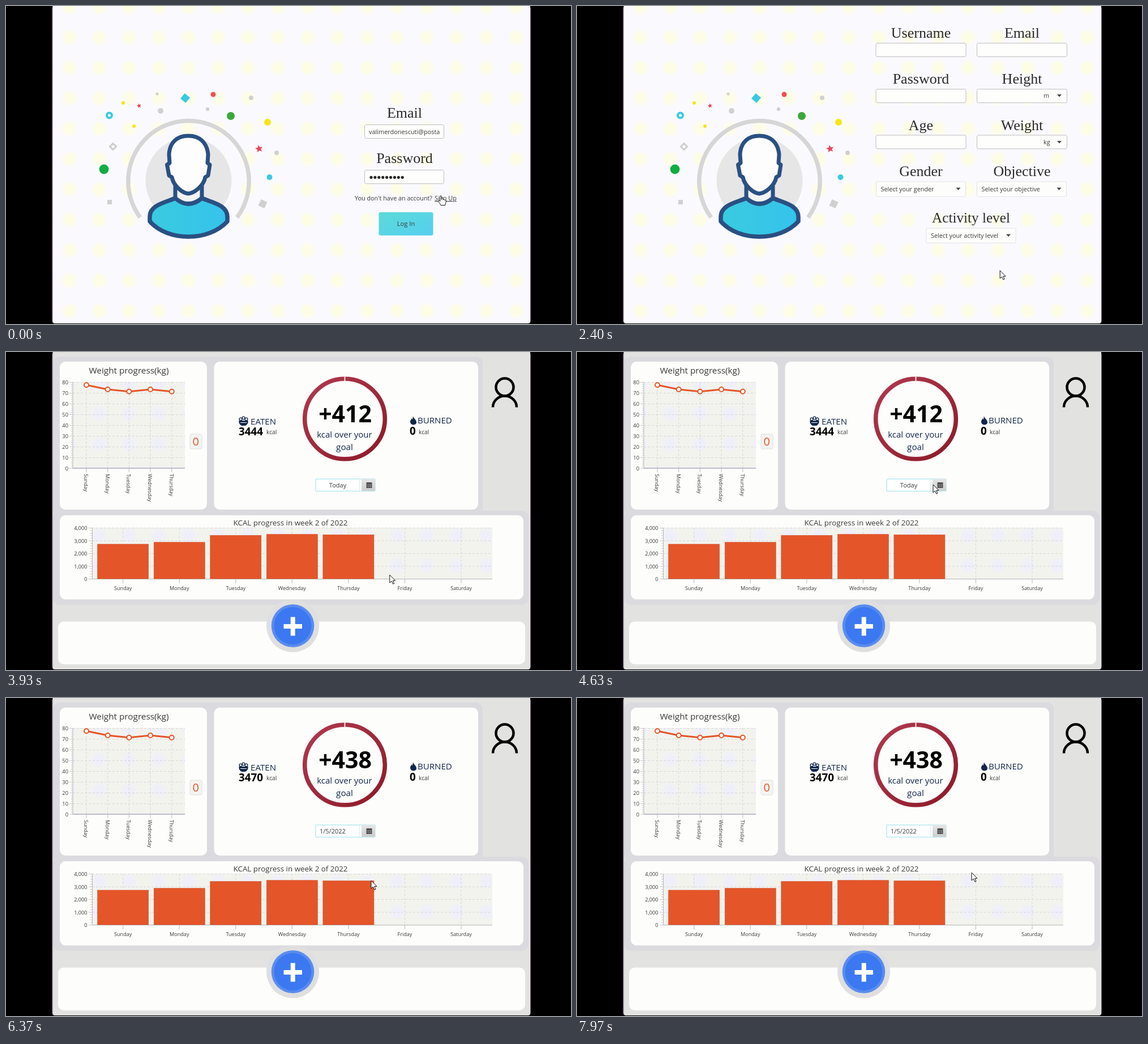
Animation, 998 px wide and 561 px high, one loop 8000 ms. Source, as an HTML page:

```html
<!DOCTYPE html>
<html lang="en">
<head>
<meta charset="utf-8">
<title>Calorie tracker</title>
<style>
  html, body { margin: 0; width: 100%; height: 100%; overflow: hidden; background: #000; }
  svg { display: block; width: 998px; height: 561px; }
  text { font-family: 'Open Sans', 'Noto Sans', sans-serif; fill: #3a3a3a; }
  .serif { font-family: 'Liberation Serif', 'Times New Roman', serif; fill: #2b2b2b; }
  .bold { font-weight: 700; fill: #000; }
  .navy { fill: #10264a; }
</style>
</head>
<body>
<svg id="stage" viewBox="0 0 998 561"></svg>
<script>
const ORANGE = '#e45529', CYAN = '#38cbe0', GREY = '#d0d0d0', NAVY = '#2a5082', RED = '#e8465a';
const DAYS = ['Sunday', 'Monday', 'Tuesday', 'Wednesday', 'Thursday', 'Friday', 'Saturday'];
const list = (n, fn) => Array.from({ length: n }, (_, i) => fn(i)).join('');

const rect = (x, y, w, h, fill, r = 0, extra = '') =>
  `<rect x="${x}" y="${y}" width="${w}" height="${h}" rx="${r}" fill="${fill}" ${extra}/>`;
const circle = (x, y, r, fill, extra = '') =>
  `<circle cx="${x}" cy="${y}" r="${r}" fill="${fill}" ${extra}/>`;
const path = (d, fill = 'none', stroke = 'none', width = 1, extra = '') =>
  `<path d="${d}" fill="${fill}" stroke="${stroke}" stroke-width="${width}" ${extra}/>`;
const text = (x, y, size, str, anchor = 'middle', cls = '', extra = '') =>
  `<text x="${x}" y="${y}" font-size="${size}" text-anchor="${anchor}" class="${cls}" ${extra}>${str}</text>`;
const group = (id, body) => `<g id="${id}">${body}</g>`;
const label = (x, y, str) => text(x, y, 26, str, 'middle', 'serif');
const field = (x, y, w) => rect(x + .5, y + .5, w - 1, 24, '#fefefc', 3, 'stroke="#bdbdbf"');
const arrowDown = (x, y) => path(`M${x - 4} ${y - 2}h8l-4 4.5z`, '#444');
const select = (x, y, str) =>
  rect(x + .5, y + .5, 158, 26, '#fdfdfc', 2, 'stroke="#e2e2e4"') +
  text(x + 8.5, y + 17, 10.8, str, 'start') + arrowDown(x + 145.5, y + 13);
const square = (x, y, s, angle, fill) =>
  rect(x - s / 2, y - s / 2, s, s, fill, 0, `transform="rotate(${angle} ${x} ${y})"`);
const star = (x, y, r) => path('M' + Array.from({ length: 10 }, (_, i) => {
  const a = i * Math.PI / 5 - 1.75, d = i % 2 ? r * .45 : r;
  return `${x + d * Math.cos(a)} ${y + d * Math.sin(a)}`;
}).join('L') + 'z', RED);

const blobs = (id, color) => `
  <radialGradient id="${id}Spot"><stop offset=".45" stop-color="${color}"/>
    <stop offset="1" stop-color="${color}" stop-opacity="0"/></radialGradient>
  <pattern id="${id}" x="85.7" y="28.7" width="52.6" height="53.6" patternUnits="userSpaceOnUse">
    ${circle(26.3, 26.8, 16, `url(#${id}Spot)`)}</pattern>`;
const gradient = (id, from, to, dir = 'x2="1"') =>
  `<linearGradient id="${id}" ${dir}><stop stop-color="${from}"/><stop offset="1" stop-color="${to}"/></linearGradient>`;

const defs = `<defs>
  ${blobs('yellow', '#fdfde6')}${blobs('lavender', '#efeffa')}
  ${gradient('button', '#5bdad8', '#55cff0', 'x2="1" y2="1"')}
  ${gradient('ring', '#b03a50', '#8c1a28', 'x2="1" y2="1"')}
  ${gradient('grey', '#e6e6e6', '#cccccc', 'x2="0" y2="1"')}
  ${gradient('shirt', '#3acbe0', '#35c3ec')}
  <filter id="shadow" x="-10%" y="-10%" width="120%" height="125%">
    <feDropShadow dx="0" dy="3" stdDeviation="4" flood-opacity=".4"/></filter>
</defs>`;

function portrait() {
  const confetti =
    circle(182.5, 193, 4.5, '#fff', `stroke="${CYAN}" stroke-width="4"`) +
    [[207, 171, 3, '#f5e617'], [226, 212, 3, '#f5e617'], [462, 205, 6, '#f5e617'],
     [267, 155, 2.6, GREY], [273, 185, 5, GREY], [356, 182, 3.2, GREY], [433, 162, 4, GREY], [478, 259, 4, GREY],
     [366, 156, 4.5, '#ee5050'], [397, 194, 7, '#3aa83a'], [173, 288, 8.4, '#12ad42'], [465.5, 302, 5, CYAN]]
      .map(c => circle(...c)).join('') +
    square(316.5, 162.5, 12, 40, CYAN) + square(183, 346, 8, 0, GREY) + square(453.5, 349, 12, 25, GREY) +
    square(189, 248, 11, 45, GREY) + circle(189, 248, 2.5, '#fff') +
    star(235, 176, 4.3) + star(447, 252, 7);
  return confetti + circle(322.5, 308, 76, '#e6e6e7') +
    path('M237 373A106.7 106.7 0 1 1 408 373', 'none', '#d6d6d6', 7.5) +
    path('M299 314V342Q322 358 346 342V314', '#f3f3f3', NAVY, 7) +
    path('M299 339C280 347 254 351 254 372V380C286 416 358 416 391 380V372C391 351 365 347 346 339Q322 359 299 339Z',
      'url(#shirt)', NAVY, 7.5, 'stroke-linejoin="round"') +
    path('M289 277L288 262C289 240 303 229 322 229S355 240 357 262L356 277L360 280L357 299L352 302C349 318 332 330 322 331C312 330 296 318 293 302L288 299L284.5 280Z',
      '#fdfdfd', NAVY, 7, 'stroke-linejoin="round"');
}

const login =
  label(704, 197, 'Email') + field(633, 209, 141) +
  text(641, 226, 10.9, 'valimerdonescuti@posta', 'start') +
  label(704, 277, 'Password') + field(633, 289, 141) +
  list(9, i => circle(645 + 6.9 * i, 302.3, 2.6, '#2a2a2a')) +
  text(616, 343, 10.8, "You don't have an account?", 'start') +
  text(757, 343, 10.9, 'Sign Up', 'start', '', 'text-decoration="underline"') +
  group('logButton', rect(658.5, 364, 96, 41, 'url(#button)', 3) + text(706.5, 388, 11.2, 'Log In'));

const signUp =
  [['Username', 'Email'], ['Password', 'Height'], ['Age', 'Weight'], ['Gender', 'Objective']].map((row, i) =>
    row.map((name, col) => label(607.5 + col * 178.5, 56 + i * 81.3, name) +
      (i < 3 ? field(527.5 + col * 178.5, 65 + i * 81.2, 160) : '')).join('')).join('') +
  [['m', 158], ['kg', 240]].map(([unit, y]) => text(824, y + 3.5, 10.8, unit, 'start') + arrowDown(852, y)).join('') +
  select(528, 309.5, 'Select your gender') + select(706, 309.5, 'Select your objective') +
  text(696, 382, 25.2, 'Activity level', 'middle', 'serif') + select(616.5, 391.5, 'Select your activity level');

const activityMenu =
  rect(618, 419.5, 244.5, 126, '#fdfdfc', 0, 'stroke="#c3c3cc" filter="url(#shadow)"') +
  rect(618.5, 422, 243.5, 24.5, '#0fa1c3') +
  ['Sedentary (little or no exercise)', 'Lightly active (exercise 1–3 days/week)',
   'Moderately active (exercise 3–5 days/week)', 'Active (exercise 6–7 days/week)',
   'Very active (hard exercise 6–7 days/week)']
    .map((s, i) => text(637, 438 + 24.1 * i, 10.7, s, 'start', '', i ? '' : 'style="fill:#fff"')).join('');

const dashed = d => path(d, 'none', '#d6d6d4', 1, 'stroke-dasharray="4 3"');
const plot = (x, y, w, h) => rect(x, y, w, h, '#f3f3ee') + rect(x, y, w, h, 'url(#lavender)');

function weightChart() {
  const xs = i => 142 + 37.7 * i, ys = [58.3, 66, 69.8, 66, 69.8];
  return text(217, 37.5, 15.3, 'Weight progress(kg)') + plot(118, 53, 198, 152) +
    list(8, i => dashed(`M118 ${53.5 + 19 * i}H316`)) + list(5, i => dashed(`M${xs(i)} 53V205`)) +
    list(41, i => path(`M${i % 5 ? 115 : 112} ${53.5 + 3.79 * i}H118`, 'none', '#c4c4c4')) +
    path('M118 53V205', 'none', '#b8b8b8') + path('M118 205H316', 'none', '#a9a9c2', 1.6) +
    list(9, i => text(110, 57 + 19 * i, 9.3, 80 - 10 * i, 'end')) +
    list(5, i => path(`M${xs(i)} 206v6`, 'none', '#b8b8b8') +
      text(0, 0, 9.1, DAYS[i], 'start', '', `transform="translate(${xs(i) - 4} 215) rotate(90)"`)) +
    path('M' + ys.map((y, i) => `${xs(i)} ${y}`).join('L'), 'none', ORANGE, 3) +
    ys.map((y, i) => circle(xs(i), y, 4, '#fff', `stroke="${ORANGE}" stroke-width="2"`)).join('') +
    rect(325, 145, 21, 26, '#f5f4f2', 3, 'stroke="#dedede"') +
    text(335.3, 165, 20, '0', 'middle', '', `style="fill:${ORANGE}"`);
}

function calorieChart() {
  const tops = [339, 335.7, 323.6, 321.7, 322.5], xs = i => 206.7 + 99.55 * i;
  return text(502.5, 306, 13.4, 'KCAL progress in week 2 of 2022') + plot(152, 310, 707, 90) +
    list(4, i => dashed(`M152 ${310.5 + 22.5 * i}H859`)) + list(7, i => dashed(`M${xs(i)} 310V400`)) +
    list(21, i => path(`M${i % 5 ? 149 : 146} ${310.5 + 4.5 * i}H152`, 'none', '#c4c4c4')) +
    path('M152.5 310V400.5H859', 'none', '#b4b4b4') +
    ['4,000', '3,000', '2,000', '1,000', '0'].map((s, i) => text(143.5, 314 + 22.5 * i, 9.2, s, 'end')).join('') +
    tops.map((y, i) => rect(xs(i) - 45, y, 90, 400 - y, ORANGE, 0, 'stroke="#d04c26" stroke-width=".6"')).join('') +
    list(7, i => path(`M${xs(i)} 401v7`, 'none', '#b8b8b8') + text(xs(i), 420, 9.1, DAYS[i]));
}

const summary =
  circle(598.5, 118, 70.8, 'none', 'stroke="url(#ring)" stroke-width="7.6"') +
  path('M598.5 42v10', 'none', '#f4e6e8', 2) +
  text(599, 124, 41, '', 'middle', 'bold', 'id="excess"') +
  text(598, 151, 15, 'kcal over your', 'middle', 'navy') + text(598, 173, 15.2, 'goal', 'middle', 'navy') +
  path('M411.500 121h16a8 8 0 0 1-5 9h-6a8 8 0 0 1-5-9z', '#10264a') +
  [[414.5, 118.5], [419.5, 116.5], [424.5, 118.5]].map(([x, y]) =>
    circle(x, y, 2.4, '#fff', 'stroke="#10264a" stroke-width="1.3"')).join('') +
  path('M414 124.500h11', 'none', '#fff', 1) +
  text(432, 128, 15.1, 'EATEN', 'start', 'navy') + text(411, 147, 18.8, '', 'start', 'bold', 'id="eaten"') +
  text(460, 145, 10.2, 'kcal', 'start') +
  path('M719 113C720 118 725 119 725 124C725 130 714 130 714 123C714 120 716 120 716 117L718 119Z', '#10264a') +
  text(727, 126, 15.1, 'BURNED', 'start', 'navy') + text(713, 146, 18.8, '0', 'start', 'bold') +
  text(729, 145, 10.2, 'kcal', 'start') +
  rect(547, 224, 105, 21.500, '#fff', 2, 'stroke="#c9eef4" stroke-width="2"') +
  rect(628, 224, 24, 21, 'url(#grey)', 2) + path('M624.500 225v20', 'none', '#d5eff3') +
  rect(636.5, 230, 10, 10, '#4a4a4a', 1) + path('M636.500 233.500h10M636.500 236.500h10M640 233v7M643.500 233v7', 'none', '#aaa', .6) +
  text(586, 239, 11, 'Today', 'middle', '', 'id="today"') + text(554, 238.5, 11, '1/5/2022', 'start', '', 'id="date"');

const dashboard =
  rect(82, 0, 844, 560, '#e2e2e1') + rect(83, 8, 759, 280, '#dbdade', 12) + rect(83, 280, 840, 166, '#dbdade', 12) +
  [[95, 17, 260, 261], [367.5, 17, 466.5, 261], [95, 288, 819, 148.5], [92, 475.5, 825, 75.500]]
    .map(([x, y, w, h]) => rect(x, y, w, h, '#fdfdfb', 10)).join('') +
  weightChart() + summary + calorieChart() +
  circle(881, 62, 15.5, 'none', 'stroke="#000" stroke-width="4.5"') +
  path('M860 97.500A21 20 0 0 1 902 97.500', 'none', '#000', 4.5) +
  circle(506.5, 483, 46.5, '#dfdfdf') + circle(506.5, 483, 37.8, '#5a8cee') + circle(506.5, 483, 33, '#3c78f2') +
  path('M490.500 484h32.500M506.700 467.500v33', 'none', '#fff', 8);

const cellX = c => 546.8 + 27.85 * c, cellY = r => 299 + 24.7 * r;
const calendar =
  rect(546.5, 247.5, 195.500, 200.500, '#e4e4e6', 0, 'stroke="#b4b4b6" filter="url(#shadow)"') +
  rect(547, 248, 194.5, 28.500, '#dcdcdc') + rect(547, 276.5, 194.5, 22.500, '#eeeeee') +
  text(594, 266, 10.8, 'January') + text(708.5, 266, 10.3, '2022') +
  [[556, 1], [629, -1], [685, 1], [729, -1]].map(([x, d]) =>
    path(`M${x + 2 + 2 * d} 258.500l${-4 * d} 3.500l${4 * d} 3.500`, 'none', '#555', 1.2)).join('') +
  DAYS.map((d, i) => text(cellX(i) + 13.9, 292, 10, d.slice(0, 3))).join('') +
  list(42, i => {
    const inMonth = i > 5 && i < 37, x = cellX(i % 7), y = cellY(i / 7 | 0);
    return rect(x + .5, y + .5, 26.8, 23.7, inMonth ? '#fcfcfb' : '#f0f0f3', 0, `id="cell${i}"`) +
      text(x + 13.9, y + 16.2, 10.6, (i + 25) % 31 + 1, 'middle', '', `id="day${i}"`);
  });

const cursors =
  group('arrow', path('M0 0V14L3.300 11L5.800 16.200L8 15.200L5.600 10.200H10Z', '#fff', '#111', 1)) +
  group('hand', path('M-1.300 1C-1.300-.6 1.300-.6 1.300 1V6.500C2-.0 4.200 5.500 4.200 7C5.200 5.800 6.600 6.300 6.700 7.600C8 6.800 9.300 7.500 9.200 9C9.200 13 8 13.500 7.600 16.500H0C-.5 14-3.500 11.500-4.700 9C-4.700 7.300-2.800 7.500-1.300 9.500Z',
    '#fff', '#111', 1, 'stroke-linejoin="round"'));

const stage = document.getElementById('stage');
stage.innerHTML = defs +
  rect(81, 0, 846, 560, '#705a78', 5) +
  `<clipPath id="window">${rect(82.5, -10, 843.5, 570, '#000', 4)}</clipPath><g clip-path="url(#window)">` +
  group('account', rect(82, 0, 844, 560, '#faf9fe') + rect(82, 0, 844, 560, 'url(#yellow)') +
    portrait() + group('login', login) + group('signUp', signUp) + group('activityMenu', activityMenu)) +
  group('dashboard', dashboard) + group('calendar', calendar) + '</g>' + group('cursor', cursors);

const $ = id => document.getElementById(id);
const show = (id, on) => $(id).setAttribute('display', on ? 'inline' : 'none');

// Pointer stops: time, x, y
const STOPS = [[0, 768, 335], [200, 768, 336], [680, 738, 404], [800, 738, 404], [1000, 762, 432], [1270, 774, 389],
  [1670, 800, 384], [2500, 745, 470], [2700, 742, 470], [3370, 684, 416], [3500, 678, 394], [3900, 678, 394],
  [4630, 629, 234], [4700, 632, 233], [5370, 632, 233], [5830, 656, 321], [6100, 645, 335], [6250, 645, 335],
  [6800, 645, 231], [7010, 645, 231], [7700, 697, 308], [8000, 697, 308]];

function pointer(t) {
  const i = STOPS.findIndex(s => s[0] > t), [t0, x0, y0] = STOPS[i - 1], [t1, x1, y1] = STOPS[i];
  const p = (t - t0) / (t1 - t0), e = p * p * (3 - 2 * p);
  return [x0 + (x1 - x0) * e, y0 + (y1 - y0) * e];
}

function paintCalendar(x, y, selected) {
  const col = Math.floor((x - cellX(0)) / 27.85), row = Math.floor((y - cellY(0)) / 24.7);
  const hovered = col >= 0 && col < 7 && row >= 0 && row < 6 ? row * 7 + col : -1;
  for (let i = 0; i < 42; i++) {
    const base = i > 5 && i < 37 ? '#fcfcfb' : '#f0f0f3', chosen = i === selected;
    $('cell' + i).setAttribute('fill', chosen ? '#0fa1c3' : i === hovered ? '#cbcbcf' : base);
    $('cell' + i).setAttribute('stroke', i === 11 ? '#b5b5b7' : 'none');
    $('day' + i).style.fill = chosen ? '#fff' : '';
  }
}

function draw(t) {
  const home = t >= 3900, form = t >= 230 && t < 2650, picked = t >= 6200;
  const open = (t >= 5000 && !picked) || (t >= 7000 && t < 7970);
  const [x, y] = pointer(t), hand = !home && !form && (t < 230 || t >= 3370);
  show('account', !home);
  show('login', !form);
  show('signUp', form);
  show('activityMenu', t >= 760 && t < 1650);
  show('dashboard', home);
  show('calendar', open);
  show('today', !picked);
  show('date', picked);
  show('hand', hand);
  show('arrow', !hand);
  $('excess').textContent = picked ? '+438' : '+412';
  $('eaten').textContent = picked ? '3470' : '3444';
  const grow = 1 + .045 * Math.min(1, Math.max(0, (t - 3370) / 130));
  $('logButton').setAttribute('transform', `translate(706.5 384.2) scale(${grow}) translate(-706.5 -384.5)`);
  $('cursor').setAttribute('transform', `translate(${x} ${y})`);
  if (open) paintCalendar(x, y, picked ? 10 : 11);
}

function tick() {
  draw(performance.now() % 8000);
  requestAnimationFrame(tick);
}
tick();
</script>
</body>
</html>
```
